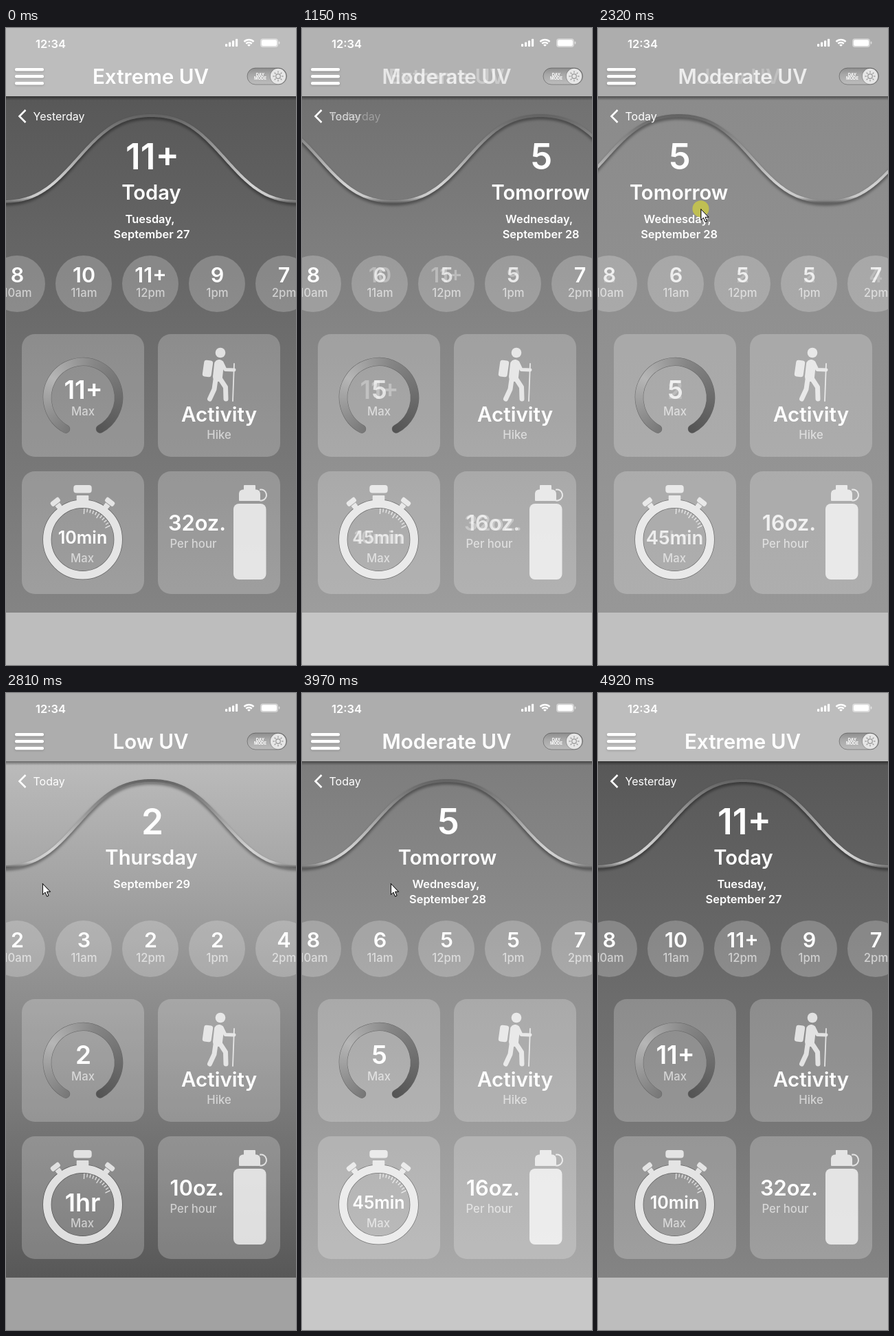
An HTML page with a canvas for the animation above (5.32 s loop, 422x924 px).

```html
<!DOCTYPE html>
<html lang="en">
<head>
<meta charset="utf-8">
<title>UV forecast</title>
<style>
html, body { margin: 0; width: 100%; height: 100%; overflow: hidden; background: #bdbdbd; }
canvas { display: block; width: 422px; height: 924px; }
</style>
</head>
<body>
<canvas id="stage" width="422" height="924"></canvas>
<script>
const W = 422, H = 924, LOOP = 5320, STEP = 68.65, PHASE = 728;
const PAGE = 429, MID = 211.5;
const FONT = 'Inter, Roboto, sans-serif';
const ctx = document.getElementById('stage').getContext('2d');

const days = [
  { title: 'Extreme UV', back: 'Yesterday', uv: '11+', name: 'Today', date: ['Tuesday,', 'September 27'],
    hours: ['8', '10', '11+', '9', '7'], time: '10min', size: 25, water: '32oz.',
    head: 189, top: 88, bottom: 132, foot: 189 },
  { title: 'Moderate UV', back: 'Today', uv: '5', name: 'Tomorrow', date: ['Wednesday,', 'September 28'],
    hours: ['8', '6', '5', '5', '7'], time: '45min', size: 25, water: '16oz.',
    head: 173, top: 125, bottom: 169, foot: 200 },
  { title: 'Low UV', back: 'Today', uv: '2', name: 'Thursday', date: ['September 29'],
    hours: ['2', '3', '2', '2', '4'], time: '1hr', size: 36, water: '10oz.',
    head: 173, top: 187, bottom: 88, foot: 162 }
];

// Motion: each leg is start, duration, distance, easing
const sine = u => (1 - Math.cos(Math.PI * u)) / 2;
const out = u => 1 - (1 - u) ** 3;
const swipes = [[706, 700, 1, sine], [2090, 700, 1, sine], [3248, 500, -1, sine], [4340, 500, -1, sine]];
const glideX = [[1430, 1330, -371, sine], [3230, 410, 314, out], [3755, 470, -294, out], [4340, 500, 324, out]];
const glideY = [[1430, 1330, 53, sine]];

const clamp = u => Math.max(0, Math.min(1, u));
const travel = (legs, t) => legs.reduce((sum, [start, time, by, ease]) =>
  sum + by * ease(clamp((t - start) / time)), 0);
const tick = t => PHASE + Math.floor((t - PHASE) / STEP) * STEP;

// Drawing helpers
const white = a => `rgba(255,255,255,${a})`;
const black = a => `rgba(0,0,0,${a})`;
const grey = v => `rgb(${v},${v},${v})`;

function shade(gradient, stops) {
  stops.forEach(([at, v]) => gradient.addColorStop(at, grey(v)));
  return gradient;
}
function box(c, x, y, w, h, r, fill) {
  c.beginPath();
  c.roundRect(x, y, w, h, r);
  c.fillStyle = fill;
  c.fill();
}
function disc(c, x, y, r, fill) {
  c.beginPath();
  c.arc(x, y, r, 0, 7);
  c.fillStyle = fill;
  c.fill();
}
function line(c, width, color, ...pts) {
  c.beginPath();
  pts.forEach(([x, y]) => c.lineTo(x, y));
  c.lineWidth = width;
  c.strokeStyle = color;
  c.stroke();
}
function arc(c, x, y, r, from, to, width, color) {
  c.beginPath();
  c.arc(x, y, r, from, to);
  c.lineWidth = width;
  c.strokeStyle = color;
  c.stroke();
}
function text(s, x, y, size, weight = 600, alpha = 1, align = 'center') {
  ctx.font = `${weight} ${size}px ${FONT}`;
  ctx.textAlign = align;
  ctx.fillStyle = white(alpha);
  ctx.fillText(s, x, y);
}
const note = (s, x, y, align) => text(s, x, y, 16.7, 500, .6, align);

// Crossfades the label of each day; equal labels stay solid.
function blend(get, mix, x, y, size, weight, align) {
  const sum = new Map();
  days.forEach((d, i) => sum.set(get(d), (sum.get(get(d)) || 0) + mix[i]));
  sum.forEach((a, s) => { if (a > .001) text(s, x, y, size, weight, Math.min(1, a), align); });
}

// Icons, drawn once in white
const icons = document.createElement('canvas');
icons.width = W;
icons.height = H;

function drawHiker(c) {
  disc(c, 312, 471, 7.3, '#fff');
  c.save();
  c.translate(293.5, 494);
  c.rotate(.14);
  box(c, -6.5, -12, 13, 24, 3.5, '#fff');
  c.restore();
  c.lineJoin = c.lineCap = 'round';
  line(c, 14, '#fff', [310, 488], [308, 506]);
  line(c, 5, '#fff', [314, 485], [319, 495.5], [332, 496]);
  line(c, 7, '#fff', [311, 508], [319.5, 521], [320, 538]);
  line(c, 7, '#fff', [305, 510], [303, 524], [296.5, 538]);
  line(c, 1.8, '#fff', [332, 487], [330, 541]);
}
function drawWatch(c) {
  const x = 111.5, y = 742;
  arc(c, x, y, 51.7, 0, 7, 13, black(.5));
  arc(c, x, y, 51.7, 0, 7, 11.6, '#fff');
  box(c, x - 13.2, 663, 26.4, 11.5, 4, '#fff');
  box(c, x - 8.8, 678, 17.6, 11, 1, '#fff');
  for (const side of [-1, 1]) {
    c.save();
    c.translate(x + side * 39.5, 687.5);
    c.rotate(side * .66);
    box(c, -7.5, -4, 15, 7.5, 2.5, '#fff');
    box(c, -4, 4.5, 8, 6, 0, '#fff');
    c.restore();
  }
  c.lineCap = 'butt';
  for (let i = 0; i < 11; i++) {
    const a = (3 + i * 6) * Math.PI / 180;
    const at = r => [x + r * Math.sin(a), y - r * Math.cos(a)];
    line(c, 1.3, '#fff', at(i % 5 ? 40 : 37), at(45));
  }
}
function drawBottle(c) {
  box(c, 331, 690, 47.5, 110, 8, '#fff');
  box(c, 346, 663, 17, 9, 1, '#fff');
  box(c, 339, 669.5, 31, 16.5, [6, 6, 1, 1], '#fff');
  arc(c, 371, 677.5, 8, -1.8, 1.8, 2, '#fff');
}
[drawHiker, drawWatch, drawBottle].forEach(paint => paint(icons.getContext('2d')));

function drawStatus() {
  text('12:34', 65, 29, 16.5);
  for (let i = 0; i < 4; i++) {
    const h = 4 + i * 2.4;
    box(ctx, 319 + i * 5, 27 - h, 3.2, h, 1, '#fff');
  }
  ctx.lineCap = 'butt';
  for (const r of [2, 6, 10]) arc(ctx, 353.5, 27, r, -2.35, -.79, 2.5, '#fff');
  box(ctx, 370, 15.3, 26, 12.6, 4, white(.45));
  box(ctx, 372, 17.3, 22, 8.6, 2.2, '#fff');
  box(ctx, 396.8, 19.6, 1.5, 4, 1, white(.6));
}

function drawToggle() {
  const x = 396, y = 70;
  box(ctx, 351, 58, 57.5, 24, 12, shade(ctx.createLinearGradient(0, 58, 0, 82), [[0, 142], [.4, 168], [1, 188]]));
  ctx.lineWidth = 1;
  ctx.strokeStyle = black(.3);
  ctx.stroke();
  text('DAY', 370, 69.5, 6, 700);
  text('MODE', 370, 75, 6, 700);
  disc(ctx, x, y, 12, black(.2));
  disc(ctx, x, y, 11.2, grey(230));
  arc(ctx, x, y, 3.3, 0, 7, 1.2, grey(150));
  for (let a = 0; a < 6.2; a += Math.PI / 4) {
    const at = r => [x + Math.cos(a) * r, y + Math.sin(a) * r];
    line(ctx, 1.2, grey(150), at(5), at(7.6));
  }
}

function drawHeader(v) {
  ctx.fillStyle = grey(v);
  ctx.fillRect(0, 0, W, 99);
  const fade = ctx.createLinearGradient(0, 99, 0, 105);
  fade.addColorStop(0, black(.45));
  fade.addColorStop(1, black(0));
  ctx.fillStyle = fade;
  ctx.fillRect(0, 99, W, 6);
  drawStatus();
  ctx.save();
  ctx.shadowColor = black(.22);
  ctx.shadowBlur = 3;
  ctx.shadowOffsetY = 1;
  for (const y of [58, 68, 78]) box(ctx, 13, y, 42, 4.4, 2, '#fff');
  ctx.restore();
  drawToggle();
}

// A cosine with slightly steeper flanks
function waveY(x) {
  const a = x * 2 * Math.PI / PAGE, k = .05;
  return 189.5 - 62.5 * (Math.cos(a) - k * Math.cos(3 * a)) / (1 - k);
}
function drawWave(page) {
  const tone = shade(ctx.createLinearGradient(0, 125, 0, 254), [[0, 98], [.8, 212], [.93, 200], [1, 90]]);
  const pts = [];
  for (let x = -6; x <= W + 6; x += 2) pts.push([x, waveY(x - MID + page * PAGE)]);
  ctx.save();
  ctx.shadowColor = black(.5);
  ctx.shadowBlur = 4;
  ctx.shadowOffsetY = 3;
  ctx.lineJoin = 'round';
  line(ctx, 4, tone, ...pts);
  ctx.restore();
}

function drawGauge() {
  const from = Math.PI / 2 + .5, to = Math.PI * 2.5 - .5;
  const tone = shade(ctx.createConicGradient(Math.PI / 2, 112, 536), [[.07, 120], [.34, 182], [.55, 134], [.93, 84]]);
  ctx.lineCap = 'round';
  arc(ctx, 112, 536, 52, from, to, 12.4, grey(100));
  arc(ctx, 112, 536, 52, from, to, 11.4, tone);
}

function drawPointer(t) {
  if (t < 1430 || t > 4910) return;
  const x = 424 + travel(glideX, t), y = 223 + travel(glideY, t);
  const pressed = swipes.slice(1).some(([start, time]) => t >= start && t < start + time * .7);
  if (pressed) disc(ctx, x, y, 12, 'rgba(206,205,66,.78)');
  ctx.save();
  ctx.translate(x, y);
  ctx.lineJoin = 'miter';
  line(ctx, 1, '#111', [.5, .8], [.5, 16.3], [4, 13], [6.6, 19], [9, 18], [6.5, 12.2], [11.4, 12.2], [.5, .8]);
  ctx.fillStyle = '#fff';
  ctx.fill();
  ctx.stroke();
  ctx.restore();
}

function drawDays(page) {
  days.forEach((d, i) => {
    const x = MID + (i - page) * PAGE;
    text(d.uv, x + 1.5, 205, 51.5);
    text(d.name, x, 248.5, 29.2);
    d.date.forEach((s, n) => text(s, x + (s.endsWith(',') ? -2 : .5), 283 + n * 22, 16.4));
  });
}

function drawHours(mix) {
  for (let i = 0; i < 5; i++) {
    const x = 16 + i * 97;
    disc(ctx, x, 371, 41, white(.22));
    blend(d => d.hours[i], mix, x + .5, 369, 30.5);
    note((i + 9) % 12 + 1 + (i < 2 ? 'am' : 'pm'), x + .5, 390);
  }
}

function drawCards(mix, size) {
  for (const x of [23, 221])
    for (const y of [444, 643]) box(ctx, x, y, 178, 178, 19, white(.22));

  drawGauge();
  ctx.globalAlpha = .74;
  ctx.drawImage(icons, 0, 0);
  ctx.globalAlpha = 1;

  blend(d => d.uv, mix, 112.5, 538, 37);
  note('Max', 112, 562);
  text('Activity', 310, 571, 29.6);
  note('Hike', 310, 596);
  blend(d => d.time, mix, 111.5, 739 + size * .364, size);
  note('Max', 111, 775);
  blend(d => d.water, mix, 278, 729, 30.8);
  note('Per hour', 238.5, 754, 'left');
}

function draw(t) {
  const page = travel(swipes, t);
  const mix = days.map((d, i) => Math.max(0, 1 - Math.abs(page - i)));
  const avg = key => days.reduce((s, d, i) => s + d[key] * mix[i], 0);

  ctx.fillStyle = grey(avg('foot'));
  ctx.fillRect(0, 0, W, H);
  ctx.fillStyle = shade(ctx.createLinearGradient(0, 99, 0, 848), [[0, avg('top')], [1, avg('bottom')]]);
  ctx.fillRect(0, 99, W, 749);

  drawHeader(avg('head'));
  blend(d => d.title, mix, 210.5, 81, 29.6);
  drawWave(page);
  ctx.lineCap = 'butt';
  ctx.lineJoin = 'miter';
  line(ctx, 2.6, '#fff', [28.5, 119], [19.5, 128], [28.5, 137]);
  blend(d => d.back, mix, 39.5, 134, 16, 400, 'left');
  drawDays(page);
  drawHours(mix);
  drawCards(mix, avg('size'));
  drawPointer(t);
}

function frame() {
  draw(tick(performance.now() % LOOP));
  requestAnimationFrame(frame);
}
frame();
</script>
</body>
</html>
```
